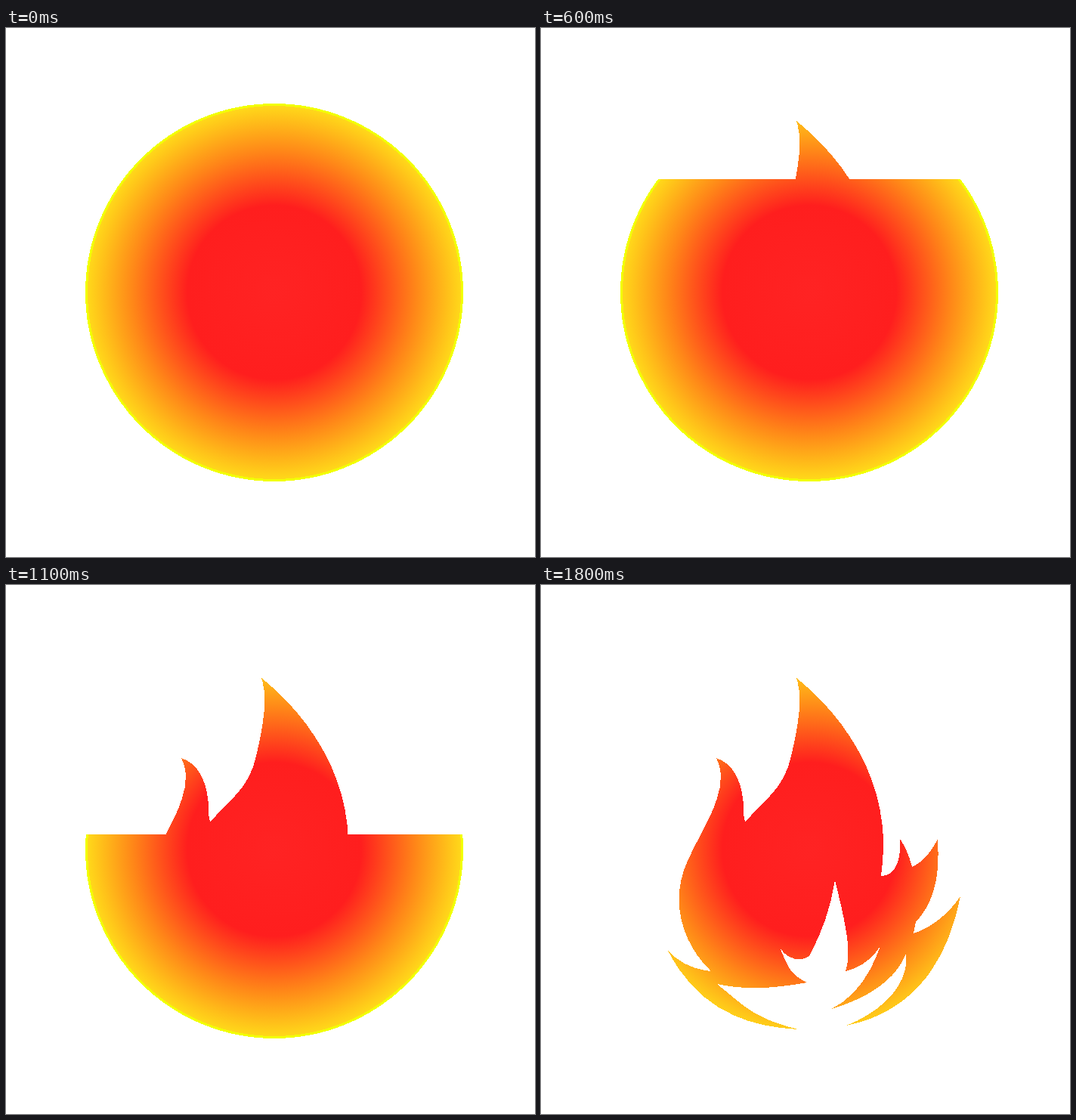
Write an HTML page that moves like this. It is 700x700 px and loops after 2000 ms.

```html
<!DOCTYPE html>
<html lang="en">
<head>
<meta charset="utf-8">
<title>Sun to flame</title>
<style>
  html, body { margin: 0; height: 100%; overflow: hidden; background: #fff; }
  svg { display: block; width: 100vw; height: 100vh; }
</style>
</head>
<body>
<svg viewBox="0 0 700 700" shape-rendering="crispEdges">
  <defs>
    <radialGradient id="heat" gradientUnits="userSpaceOnUse" cx="355" cy="350" r="250">
      <stop offset="0" stop-color="#ff2323"/>
      <stop offset=".46" stop-color="#ff1e1e"/>
      <stop offset=".75" stop-color="#ff8718"/>
      <stop offset="1" stop-color="#ffdc1a"/>
    </radialGradient>
    <clipPath id="wipe"><rect id="uncut" width="700" height="700"/></clipPath>
  </defs>
  <path fill="url(#heat)" d="M338 123 C398 171 453 249 453 343 C453 358 452 372 450 385
    C468 385 477 366 475 336 Q485 350 491 373 Q511 364 525 336
    C527 375 525 415 496 446 L493 461 Q529 449 555 412
    C537 505 488 566 404 583 C452 564 488 528 483 488
    C470 520 438 545 384 561 C413 547 434 520 449 478
    Q432 504 403 511 C409 490 409 470 389 391
    C383 428 372 459 356 489 C349 499 327 498 316 480
    C326 502 328 515 352 526 C312 533 275 537 233 528
    C268 556 280 573 340 588 C260 584 203 553 167 482
    C180 499 202 509 225 511 C186 474 170 417 194 365
    C212 323 253 271 232 229 C259 238 269 269 268 303 L270 314
    C299 280 322 270 332 222 C342 180 346 146 338 123Z"/>
  <g clip-path="url(#wipe)">
    <circle cx="355" cy="350" r="248.5" fill="url(#heat)" stroke="#f2ff00" stroke-width="3"/>
  </g>
</svg>
<script>
  const LOOP = 2000, STEP = 100;
  // Height of the cut through the disc at each step
  const cuts = [100, 114, 129, 144, 161, 180, 200, 223, 247, 273,
                301, 330, 360, 391, 431, 473, 516, 559, 610];
  const uncut = document.getElementById('uncut');
  const start = performance.now();

  function draw(now) {
    const elapsed = Math.max(0, now - start) % LOOP;
    const step = Math.min(Math.floor(elapsed / STEP), cuts.length - 1);
    uncut.setAttribute('y', cuts[step]);
    requestAnimationFrame(draw);
  }
  draw(start);
</script>
</body>
</html>
```
